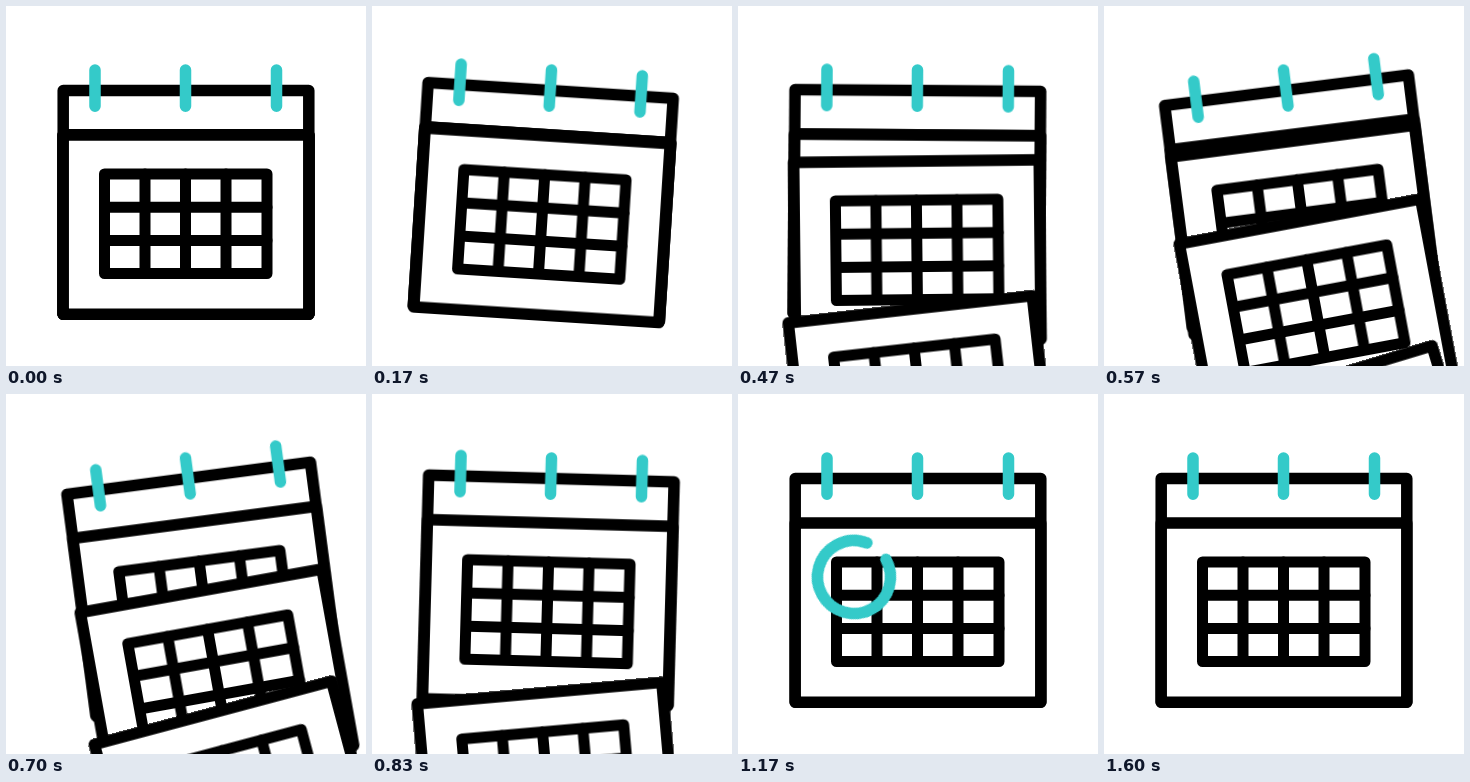
Write an HTML page that moves like this. It is 360 by 360 pixels and loops after 1670 ms.

```html
<!DOCTYPE html>
<html lang="en">
<head>
<meta charset="utf-8">
<title>Calendar</title>
<style>
  html, body { margin: 0; width: 100%; height: 100%; overflow: hidden; background: #fff; }
  svg { display: block; width: 100%; height: 100%; }

  .ink, .teal { stroke-width: 11.5; stroke-linecap: round; stroke-linejoin: round; }
  .ink { stroke: #000; fill: #fff; }
  .teal { stroke: #34cac9; fill: none; }
  .grid { stroke-width: 11; }

  .calendar, .page, .mark { animation: 1670ms linear infinite; }
  .calendar { animation-name: swing; transform-origin: 179.5px 64px; }
  .page { animation-name: fall; transform-origin: 179.5px 180px; }
  .mark { animation-name: circle; stroke-dasharray: 100 102; }

  .first { animation-delay: 150ms; }
  .second { animation-delay: 359ms; }
  .third { animation-delay: 515ms; }

  @keyframes swing {
    0% { transform: rotate(0); }
    5.988% { transform: rotate(0); animation-timing-function: cubic-bezier(.35, .15, .6, 1); }
    17.964% { transform: rotate(10deg); animation-timing-function: cubic-bezier(.37, 0, .63, 1); }
    38.323% { transform: rotate(-9deg); animation-timing-function: cubic-bezier(.37, 0, .63, 1); }
    55.689% { transform: rotate(5.3deg); animation-timing-function: cubic-bezier(.37, 0, .63, 1); }
    66.5%, 100% { transform: rotate(0); }
  }

  /* Each page slides along the calendar's axis and tilts as it goes. */
  @keyframes fall {
    0% { transform: translateY(0) rotate(0deg); animation-timing-function: cubic-bezier(.37, 0, .63, 1); }
    34.9%, 100% { transform: translateY(300px) rotate(-11.7deg); }
  }

  @keyframes circle {
    0%, 57.48% { stroke-dashoffset: 100; opacity: 0; }
    57.49% { stroke-dashoffset: 100; opacity: 1; animation-timing-function: cubic-bezier(.37, 0, .63, 1); }
    73.65% { stroke-dashoffset: 0; opacity: 1; animation-timing-function: cubic-bezier(.37, 0, .63, 1); }
    95.8% { stroke-dashoffset: -100; opacity: 1; }
    95.81%, 100% { stroke-dashoffset: -100; opacity: 0; }
  }
</style>
</head>
<body>
<svg viewBox="0 0 360 360">
  <defs>
    <g id="sheet" class="ink">
      <rect x="57.2" y="129" width="245.6" height="179.3"/>
      <g class="grid">
        <rect x="98.5" y="168" width="162.5" height="99.5"/>
        <path d="M139 168v99.5M179.5 168v99.5M220 168v99.5M98.5 201.3H261M98.5 234.5H261"/>
      </g>
    </g>
  </defs>

  <g class="calendar">
    <rect class="ink" x="57.2" y="84.5" width="245.6" height="223.8"/>
    <use href="#sheet"/>
    <path class="teal" d="M89 64v36.3M179.5 64v36.3M270.5 64v36.3"/>
    <use class="page third" href="#sheet"/>
    <use class="page second" href="#sheet"/>
    <use class="page first" href="#sheet"/>
  </g>

  <circle class="teal mark" cx="116" cy="183" r="36.5" pathLength="100" transform="rotate(-29 116 183)"/>
</svg>
</body>
</html>
```
